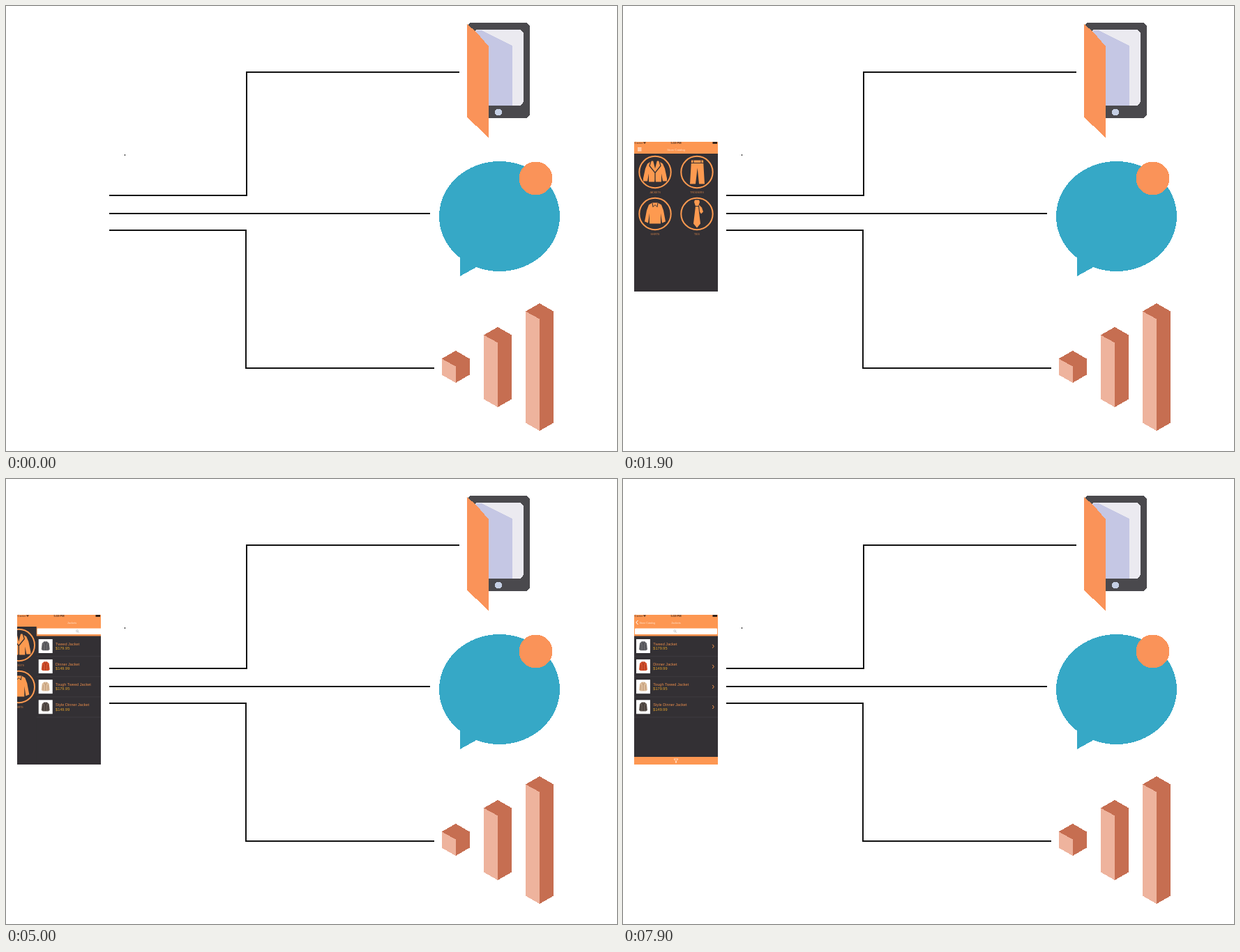
Recreate the animation shown at these times as an HTML page. Size 876 px wide and 639 px high, loop 8 s.

```html
<!DOCTYPE html>
<html lang="en">
<head>
<meta charset="utf-8">
<title>Store catalog app</title>
<style>
  html, body { margin: 0; width: 100%; height: 100%; overflow: hidden; background: #fff; }
  svg { display: block; width: 100vw; height: 100vh; }
  text { font-family: "Liberation Sans", Arial, sans-serif; }
  .crisp { shape-rendering: crispEdges; }
  .seam { fill: none; stroke: #333034; }
</style>
</head>
<body>
<svg viewBox="0 0 876 639">
  <defs>
    <clipPath id="screen"><rect x="16" y="195" width="120" height="215"/></clipPath>
  </defs>

  <g class="crisp">
    <g fill="none" stroke="#111" stroke-width="2">
      <path d="M148 272H345V95H650"/>
      <path d="M148 298H608"/>
      <path d="M148 322H344V520H614"/>
    </g>
    <rect x="170" y="213" width="1" height="2" fill="#111"/>

    <g id="tablet">
      <rect x="661" y="24" width="90" height="137" rx="7" fill="#4a494d"/>
      <rect x="670" y="34" width="72" height="109" rx="7" fill="#ebeaf0"/>
      <path d="M674 35H682L726 57V143H690L674 42Z" fill="#c5c7e4"/>
      <circle cx="706" cy="152.5" r="5" fill="#c5cfe4"/>
      <path d="M661 26L674 37L692 58V190L674 172L661 160Z" fill="#fa9359"/>
    </g>

    <g id="bubble">
      <g fill="#36a8c6">
        <ellipse cx="707.5" cy="302" rx="86.5" ry="79"/>
        <path d="M651 350V388L676 374Z"/>
      </g>
      <circle cx="759.5" cy="247.5" r="24" fill="#fa9359"/>
    </g>

    <g id="bars"></g>
  </g>

  <g id="phone" clip-path="url(#screen)">
    <rect x="16" y="195" width="120" height="215" fill="#333034"/>
    <g id="home"></g>
    <g id="list"></g>
    <rect x="16" y="195" width="120" height="17" fill="#fd9752"/>

    <g fill="#4a2c1c" font-size="4">
      <text x="16.5" y="198">Carrier</text>
      <text x="76" y="198" text-anchor="middle" font-weight="bold">5:59 PM</text>
      <path d="M29 195.5H33L31 198Z"/>
      <rect x="128.5" y="195.2" width="6.5" height="2.6" fill="#1d1512"/>
    </g>

    <g id="homeBar">
      <path d="M21 203.8H26.5M21 205.8H26.5M21 207.8H26.5" stroke="#fff" stroke-width="1"/>
      <text id="homeTitle" x="76" y="207.5" font-size="4.2" text-anchor="middle" fill="#ffe3cd">Store Catalog</text>
    </g>
    <g id="back">
      <path d="M21.5 203L18.8 206L21.5 209" fill="none" stroke="#fff"/>
      <text x="23.5" y="207.5" font-size="3.7" fill="#ffe3cd">Store Catalog</text>
    </g>
    <text id="listTitle" x="76" y="207.5" font-size="4" text-anchor="middle" fill="#ffe3cd">Jackets</text>

    <g id="toolbar">
      <rect x="16" y="399" width="120" height="11" fill="#fd9752"/>
      <path d="M73 402H79L76.5 405V407.5H75.5V405Z" fill="none" stroke="#ffe3cd" stroke-width=".8"/>
    </g>
  </g>
</svg>

<script>
const $ = id => document.getElementById(id);
const LOOP = 8000, STEP = 100;
const APPEAR = 100, PUSH = 4847, TOOLBAR = 5400;
const WIDTH = 120, ORANGE = '#fd9a50', DARK = '#333034';

// Isometric column: center x, top y, bottom y
const column = (x, top, bottom) => `
  <path d="M${x} ${top}l20 11.5V${bottom - 11.5}L${x} ${bottom}L${x - 20} ${bottom - 11.5}V${top + 11.5}Z" fill="#c66e51"/>
  <path d="M${x} ${top + 22.5}V${bottom}L${x - 20} ${bottom - 11.5}V${top + 11.5}Z" fill="#eeb39d"/>`;

$('bars').innerHTML = column(644.7, 495, 541) + column(705, 461, 576) + column(765, 427, 610);

// Garments are drawn around their circle's center
const categories = [
  ['JACKETS', 46, 238.5, `
    <path d="M-5-16H5L11-12L14-5L17 9V13H11L9 2V14H1L0 11L-1 14H-9V2L-11 13H-17V9L-14-5L-11-12Z"/>
    <path d="M-3-17H3L0-5Z" fill="${DARK}"/>
    <path d="M-6-16L-8-9L0 1L8-9L6-16M0 1V13" class="seam" stroke-width="1.3"/>`],
  ['TROUSERS', 106, 238.5, `
    <path d="M-8-17H9L11 17H3L.7-6L-2 17H-10Z"/>
    <path d="M-9-13H10M-5-17V-13M6-17V-13" class="seam"/>`],
  ['SHIRTS', 46, 298.5, `
    <path d="M-4-16H4L9-13L12-5L15 11L10 13L8-1V14H-8V-1L-10 13L-15 11L-12-5L-9-13Z"/>
    <path d="M-4-16L-3-10L0-13L3-10L4-16" class="seam"/>`],
  ['TIES', 106, 298.5, `
    <path d="M-3-20H3L4-17L2-11L5 14L0 20L-5 14L-2-11L-4-17Z"/>
    <path d="M3-13L7-9L9-3L6 0L4-3Z"/>
    <path d="M-3-11H3" class="seam"/>`]
];

$('home').innerHTML = categories.map(([label, x, y, garment]) => `
  <g transform="translate(${x} ${y})" fill="${ORANGE}">
    <circle r="22.7" fill="none" stroke="${ORANGE}" stroke-width="2"/>
    ${garment}
    <text y="30.3" font-size="3.5" text-anchor="middle" fill="#cf7f47">${label}</text>
  </g>`).join('');

const products = [
  ['Tweed Jacket', '$179.95', '#66666a', '#44444a'],
  ['Dinner Jacket', '$149.99', '#d4502c', '#9c3420'],
  ['Tough Tweed Jacket', '$179.95', '#dcbd9c', '#b8906c'],
  ['Style Dinner Jacket', '$149.99', '#5c534d', '#342e2c']
];

const productRow = ([name, price, cloth, seam], i) => `
  <g transform="translate(16 ${225.7 + i * 29.1})">
    <rect x="3" y="4.3" width="20" height="20" fill="#fff"/>
    <path d="M11 7.5H15L18 10L19 19L17 20.5H9L7 19L8 10Z" fill="${cloth}"/>
    <path d="M11 8L13 12L15 8M13 12V20M9.5 12V19M16.5 12V19" fill="none" stroke="${seam}" stroke-width=".8"/>
    <text x="27.3" y="13.3" font-size="5.6" fill="#e58a4a">${name}</text>
    <text x="27.3" y="19.6" font-size="5.6" fill="#e0a02c">${price}</text>
    <path d="M112.3 12L114.3 14.5L112.3 17" fill="none" stroke="${ORANGE}"/>
    <path d="M0 29H120" stroke="#444145" stroke-width=".7"/>
  </g>`;

$('list').innerHTML = `
  <rect x="16" y="195" width="120" height="215" fill="${DARK}"/>
  <rect x="16" y="211" width="120" height="14.5" fill="#fd9752"/>
  <rect x="17" y="214.5" width="118" height="8.5" rx="1" fill="#fff"/>
  <circle cx="74.3" cy="218.2" r="1.4" fill="none" stroke="#aaa" stroke-width=".6"/>
  <path d="M75.3 219.2L76.8 220.7" stroke="#aaa" stroke-width=".7"/>
  ${products.map(productRow).join('')}`;

const clamp = v => Math.max(0, Math.min(1, v));
const shift = (id, x, y = 0) => $(id).setAttribute('transform', `translate(${x.toFixed(2)} ${y.toFixed(2)})`);
const fade = (id, opacity) => $(id).setAttribute('opacity', clamp(opacity));

// Critically damped spring: fraction of the push still to travel
function pushRemaining(t) {
  const s = Math.max(0, t - PUSH) / 1000 * 18.3;
  const left = (1 + s) * Math.exp(-s);
  return left < 0.004 ? 0 : left;
}

function render(time) {
  const t = Math.floor(time / STEP) * STEP;
  const left = pushRemaining(t);
  $('phone').style.display = t < APPEAR ? 'none' : '';

  shift('home', -0.3 * WIDTH * (1 - left));
  shift('list', WIDTH * left);
  shift('homeTitle', -50 * (1 - left));
  shift('listTitle', 80 * left);
  fade('homeBar', left * 2 - 1);
  fade('listTitle', (1 - left) * 1.25);
  fade('back', 1 - left * 5);
  shift('toolbar', 0, 11 * (1 - clamp((t - TOOLBAR) / 200)));
}

function tick(now) {
  render(now % LOOP);
  requestAnimationFrame(tick);
}
render(0);
requestAnimationFrame(tick);
</script>
</body>
</html>
```
